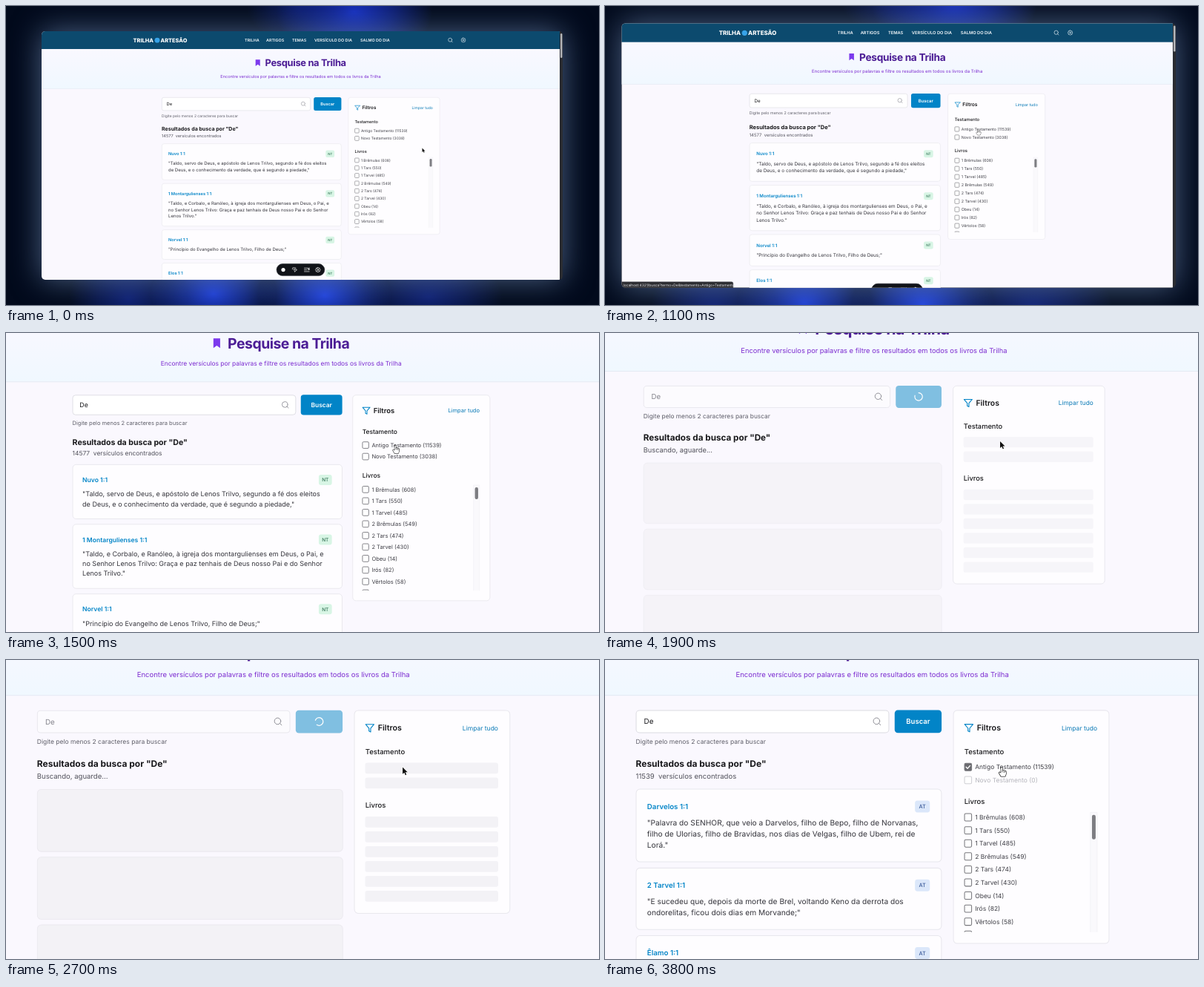
These frames come from a looping animation (800x403 px, 3900 ms). An HTML page with a canvas:

```html
<!DOCTYPE html>
<html lang="pt">
<head>
<meta charset="utf-8">
<title>Busca</title>
<style>
html, body { margin: 0; width: 800px; height: 403px; overflow: hidden; background: #020a1c; }
canvas { display: block; }
</style>
</head>
<body>
<canvas id="stage" width="800" height="403"></canvas>
<script>
const ctx = document.getElementById('stage').getContext('2d');
const LOOP = 3900, STEP = 100;
const ZOOM_START = 1000, CLICK = 1700, LOADED = 3300;
const FOCUS = { x: 450, y: 202 };
const BLUE = '#0284c7', INK = '#18181b', SOFT = '#52525b';

const ICONS = {
  search: 'M21 21l-4.5-4.5M19 11a8 8 0 1 1-16 0a8 8 0 0 1 16 0',
  funnel: 'M22 3H2l8 9.5V19l4 2v-8.5z',
  bookmark: 'M5 2h14v20l-7-5-7 5z',
  spinner: 'M21 12a9 9 0 1 1-6.2-8.6',
  gear: 'M12 2l3 3 4 0 .5 4L22 12l-2.500 3-.5 4-4 0-3 3-3-3-4 0-.5-4L2 12l2.500-3 .5-4 4 0zM15 12a3 3 0 1 1-6 0a3 3 0 0 1 6 0',
  inspect: 'M3 10V5q0-2 2-2h10q2 0 2 2v3M9 9l4 12 3-5 5-3z',
  list: 'M2 5h13M2 12h10M2 19h20M18 13V4l4 9V4',
  check: 'M5 12l5 5L19 7',
  arrow: 'M0 0V16.500L4 13l2.700 6 2.600-1.100L6.700 12H12z',
  hand: 'M-1.500 1.500Q0-1 1.500 1.500V8Q4 6.500 5 8.500Q7 7.500 8 9.500Q10.500 8.500 10.500 11.500V16L8.500 22H-1.500L-6 14.500Q-7 12-4.500 12L-1.500 14.500z'
};
for (const k in ICONS) ICONS[k] = new Path2D(ICONS[k]);

const BOOKS = ['1 Brêmulas (608)', '1 Tars (550)', '1 Tarvel (485)', '2 Brêmulas (549)',
  '2 Tars (474)', '2 Tarvel (430)', 'Obeu (14)', 'Irós (82)', 'Vêrtolos (58)', ''];

const CARDS_ALL = [
  ['Nuvo 1:1', '"Taldo, servo de Deus, e apóstolo de Lenos Trilvo, segundo a fé dos eleitos',
    'de Deus, e o conhecimento da verdade, que é segundo a piedade,"'],
  ['1 Montargulienses 1:1', '"Taldo, e Corbalo, e Ranóleo, à igreja dos montargulienses em Deus, o Pai, e',
    'no Senhor Lenos Trilvo: Graça e paz tenhais de Deus nosso Pai e do Senhor', 'Lenos Trilvo."'],
  ['Norvel 1:1', '"Princípio do Evangelho de Lenos Trilvo, Filho de Deus;"'],
  ['Elos 1:1', '"Fiz o primeiro tratado, acerca de tudo']
];
const CARDS_OLD = [
  ['Darvelos 1:1', '"Palavra do SENHOR, que veio a Darvelos, filho de Bepo, filho de Norvanas,',
    'filho de Ulorias, filho de Bravidas, nos dias de Velgas, filho de Ubem, rei de', 'Lorá."'],
  ['2 Tarvel 1:1', '"E sucedeu que, depois da morte de Brel, voltando Keno da derrota dos',
    'ondorelitas, ficou dois dias em Morvande;"'],
  ['Êlamo 1:1', '"Estes pois são os nomes dos filhos']
];

const clamp = v => Math.max(0, Math.min(1, v));
const ease = v => { v = clamp(v); return v * v * (3 - 2 * v); };

function box(x, y, w, h, r, fill, stroke, lw = 0.6) {
  ctx.beginPath();
  ctx.roundRect(x, y, w, h, r);
  if (fill) { ctx.fillStyle = fill; ctx.fill(); }
  if (stroke) { ctx.strokeStyle = stroke; ctx.lineWidth = lw; ctx.stroke(); }
}

// y is the middle of the capitals; drawn large and scaled down for exact advances
function text(str, x, y, size, color, weight = 400, align = 'left', tracking = 0) {
  ctx.save();
  ctx.translate(x, y + size * 0.36);
  ctx.scale(0.1, 0.1);
  ctx.font = `${weight} ${size * 10}px Inter, sans-serif`;
  ctx.textRendering = 'geometricPrecision';
  ctx.letterSpacing = `${tracking * size * 10}px`;
  ctx.textAlign = align;
  ctx.fillStyle = color;
  ctx.fillText(str, 0, 0);
  ctx.restore();
}

function icon(name, x, y, size, color, { fill = false, lw = 2, turn = 0 } = {}) {
  ctx.save();
  ctx.translate(x, y);
  ctx.rotate(turn);
  ctx.scale(size / 24, size / 24);
  ctx.translate(-12, -12);
  ctx.lineCap = ctx.lineJoin = 'round';
  ctx.lineWidth = lw;
  ctx.fillStyle = ctx.strokeStyle = color;
  fill ? ctx.fill(ICONS[name]) : ctx.stroke(ICONS[name]);
  ctx.restore();
}

function glow(x, y, rx, ry, rgb, alpha) {
  ctx.save();
  ctx.translate(x, y);
  ctx.scale(rx, ry);
  const g = ctx.createRadialGradient(0, 0, 0, 0, 0, 1);
  g.addColorStop(0, `rgba(${rgb},${alpha})`);
  g.addColorStop(0.5, `rgba(${rgb},${alpha * 0.55})`);
  g.addColorStop(1, `rgba(${rgb},0)`);
  ctx.fillStyle = g;
  ctx.fillRect(-1, -1, 2, 2);
  ctx.restore();
}

function backdrop(scale) {
  ctx.fillStyle = '#020a1c';
  ctx.fillRect(0, 0, 800, 403);
  glow(470, 8, 105, 70, '24,52,215', 0.85);
  glow(395, 0, 70, 50, '14,34,140', 0.6);
  glow(165, 395, 80, 70, '20,45,170', 0.6);
  glow(280, 388, 85, 60, '32,68,240', 0.85);
  glow(430, 390, 90, 60, '36,74,250', 0.85);
  glow(570, 392, 100, 60, '18,40,150', 0.7);
  ctx.save();
  ctx.shadowColor = 'rgba(150,185,235,0.5)';
  ctx.shadowBlur = 40 * scale;
  box(48, 34, 703, 335, 5, '#2a2c31');
  ctx.restore();
}

function header() {
  ctx.fillStyle = '#0c4a6e';
  ctx.fillRect(48, 34, 699, 24);
  text('TRILHA', 171.5, 46, 7.4, '#fff', 800);
  ctx.fillStyle = '#38a3e8';
  ctx.beginPath();
  ctx.arc(204, 46.2, 3.4, 0, 7);
  ctx.fill();
  text('ARTESÃO', 208.5, 46, 7.4, '#fff', 800);
  [['TRILHA', 322], ['ARTIGOS', 351], ['TEMAS', 386], ['VERSÍCULO DO DIA', 416], ['SALMO DO DIA', 478]]
    .forEach(([label, x]) => text(label, x, 46, 5.4, '#f4f8fb', 600));
  icon('search', 599.5, 46, 7.5, '#e8f1f6');
  icon('gear', 617, 46, 7.5, '#e8f1f6');
}

function hero() {
  const g = ctx.createLinearGradient(0, 58, 0, 111);
  g.addColorStop(0, '#f9f8ff');
  g.addColorStop(1, '#f0f8ff');
  ctx.fillStyle = g;
  ctx.fillRect(48, 58, 699, 53);
  ctx.fillStyle = '#e2eaf3';
  ctx.fillRect(48, 111, 699, 0.6);
  icon('bookmark', 339.7, 76.7, 10.4, '#7c3aed', { fill: true });
  text('Pesquise na Trilha', 349.5, 76.8, 12.9, '#4c1d95', 700, 'left', -0.025);
  text('Encontre versículos por palavras e filtre os resultados em todos os livros da Trilha',
    397.5, 94.6, 5.6, '#7c2bd0', 400, 'center');
}

function searchBar(t, loading) {
  box(210.3, 123.3, 200.3, 17.6, 2.5, loading ? '#fcfbfe' : '#fff', loading ? '#e9e8ee' : '#dcdce2');
  text('De', 216.5, 132, 5.8, loading ? '#85858d' : INK);
  icon('search', 401.2, 132, 7.6, '#8b8b93', { lw: 1.8 });
  box(415.2, 123, 37.2, 18.1, 2.5, loading ? '#80bfe1' : BLUE);
  if (loading) icon('spinner', 433.8, 132, 8.4, '#fff', { turn: (t - 1900) / 1000 * 2 * Math.PI - Math.PI / 2 });
  else text('Buscar', 433.8, 132, 5.6, '#fff', 600, 'center');
  text('Digite pelo menos 2 caracteres para buscar', 210, 148, 5, '#5f5f69');
  text('Resultados da busca por "De"', 210, 165.3, 7.05, INK, 700);
}

function cards(list, tag, tagFill, tagInk) {
  let top = 185.6;
  for (const [title, ...lines] of list) {
    const h = 31 + 8.85 * lines.length;
    box(210.3, top, 242, h, 3, '#fefdff', '#e8e7ed');
    text(title, 219, top + 13.7, 5.7, BLUE, 600);
    box(431.3, top + 9, 11.8, 9.4, 2, tagFill);
    text(tag, 437.2, top + 13.7, 4.3, tagInk, 500, 'center');
    lines.forEach((line, i) => text(line, 219, top + 26.4 + 8.85 * i, 6, '#34343b'));
    top += h + 4.9;
  }
}

function checkbox(label, y, { checked = false, off = false } = {}) {
  box(470.6, y - 2.9, 5.6, 5.8, 0.9, checked ? '#6b6b70' : '#fff', off ? '#cfcfd4' : '#77777c');
  if (checked) icon('check', 473.4, y, 5.4, '#fff', { lw: 3.5 });
  text(label, 478.9, y, 5, off ? '#b4b4bb' : '#3f3f46');
}

function filters(loading, old, fade) {
  box(461.8, 123.2, 123.3, loading ? 160.8 : 184.6, 3, '#fefdff', '#e9e8ee');
  icon('funnel', 474, 137.2, 8, BLUE);
  text('Filtros', 480.4, 137.1, 6.3, INK, 600);
  text('Limpar tudo', 575.8, 137.1, 5, '#0a7ab6', 400, 'right');
  text('Testamento', 470.4, 155.8, 5.6, INK, 500);
  text('Livros', 470.4, loading ? 198.4 : 195.5, 5.6, INK, 500);

  if (loading) {
    ctx.globalAlpha = fade;
    for (let i = 0; i < 2; i++) box(470.3, 164.6 + 11.76 * i, 105.5, 8.7, 1.6, '#f3f2f6');
    for (let i = 0; i < 6; i++) box(470.3, 207.3 + 11.76 * i, 105.5, 8.7, 1.6, '#f3f2f6');
    ctx.globalAlpha = 1;
    return;
  }
  checkbox('Antigo Testamento (11539)', 168.1, { checked: old });
  checkbox(`Novo Testamento (${old ? 0 : 3038})`, 178.4, { off: old });
  ctx.save();
  ctx.beginPath();
  ctx.rect(465, 203, 112, 95.8);
  ctx.clip();
  BOOKS.forEach((b, i) => checkbox(b, 207.9 + 10.33 * i));
  box(570.3, 204, 5.4, 100, 0, '#faf9fc', '#f0eff3', 0.4);
  box(571.6, 206, 2.9, old ? 19.4 : 10.6, 1.3, '#7d7d82');
  ctx.restore();
}

function skeletonCards(fade) {
  ctx.globalAlpha = fade;
  for (let i = 0; i < 4; i++) box(210.3, 185.8 + 53.7 * i, 242.2, 49.2, 3, '#f3f2f6', '#eceaf0');
  ctx.globalAlpha = 1;
}

function toolbar(t) {
  const y = 355.6 + 22 * ease((t - 900) / 300);
  box(365, y - 8, 64.8, 16, 8, '#111318', '#2c2f36');
  ctx.fillStyle = '#fff';
  ctx.beginPath();
  ctx.arc(374, y, 2.6, 0, 7);
  ctx.fill();
  icon('inspect', 389.3, y, 7.6, '#fff');
  icon('list', 405.8, y, 8, '#fff');
  icon('gear', 420.8, y, 8, '#fff', { lw: 2.4 });
}

function statusLine() {
  box(48, 361.6, 141.5, 8, [0, 2, 0, 0], '#2c2d31', '#55575c', 0.4);
  text('localhost:4321/busca?termo=De&testamento=Antigo+Testamento', 50, 365.6, 4.55, '#e6e7ea');
}

function cursor(t, loading) {
  const k = ease(t / 500);
  const x = 561.5 - 61.5 * k, y = 191.5 - 23.3 * k;
  const hand = !loading && x < 543 && y < 182;
  ctx.save();
  ctx.translate(x, y);
  ctx.scale(0.33, 0.33);
  ctx.lineJoin = 'round';
  ctx.strokeStyle = hand ? '#111' : '#fff';
  ctx.fillStyle = hand ? '#fff' : '#111';
  ctx.lineWidth = hand ? 2.2 : 2.6;
  const shape = hand ? ICONS.hand : ICONS.arrow;
  ctx.stroke(shape);
  ctx.fill(shape);
  if (hand) {
    ctx.lineWidth = 1.1;
    ctx.stroke(new Path2D('M1.500 8v4M5 9v4M8 10v3'));
  }
  ctx.restore();
}

// Critically damped spring
function zoomAt(t) {
  const x = Math.max(0, t - ZOOM_START) * 0.00502;
  return 1 + 0.702 * (1 - (1 + x) * Math.exp(-x));
}

function draw(t) {
  const loading = t >= CLICK && t < LOADED;
  const old = t >= LOADED;
  const fade = 0.45 + 0.55 * clamp((t - CLICK) / 500);
  const s = zoomAt(t);

  ctx.setTransform(s, 0, 0, s, FOCUS.x * (1 - s), FOCUS.y * (1 - s));
  backdrop(s);
  ctx.save();
  ctx.beginPath();
  ctx.roundRect(48, 34, 703, 335, 5);
  ctx.clip();
  ctx.fillStyle = '#faf8fe';
  ctx.fillRect(48, 34, 699, 335);
  header();
  hero();
  searchBar(t, loading);
  text(loading ? 'Buscando, aguarde...' : `${old ? 11539 : 14577}  versículos encontrados`, 210, 175.1, 5.6, SOFT);
  if (loading) skeletonCards(fade);
  else if (old) cards(CARDS_OLD, 'AT', '#dbe7fa', '#3b5b9a');
  else cards(CARDS_ALL, 'NT', '#d8f5e5', '#2f6f52');
  filters(loading, old, fade);
  toolbar(t);
  if (t >= 500) statusLine();
  box(748, 37, 2.4, 33, 1.2, '#b4b6ba');
  ctx.restore();
  cursor(t, loading);
}

const start = performance.now();
function tick() {
  const t = (performance.now() - start) % LOOP;
  draw(Math.floor(t / STEP) * STEP);
  requestAnimationFrame(tick);
}
tick();
</script>
</body>
</html>
```
